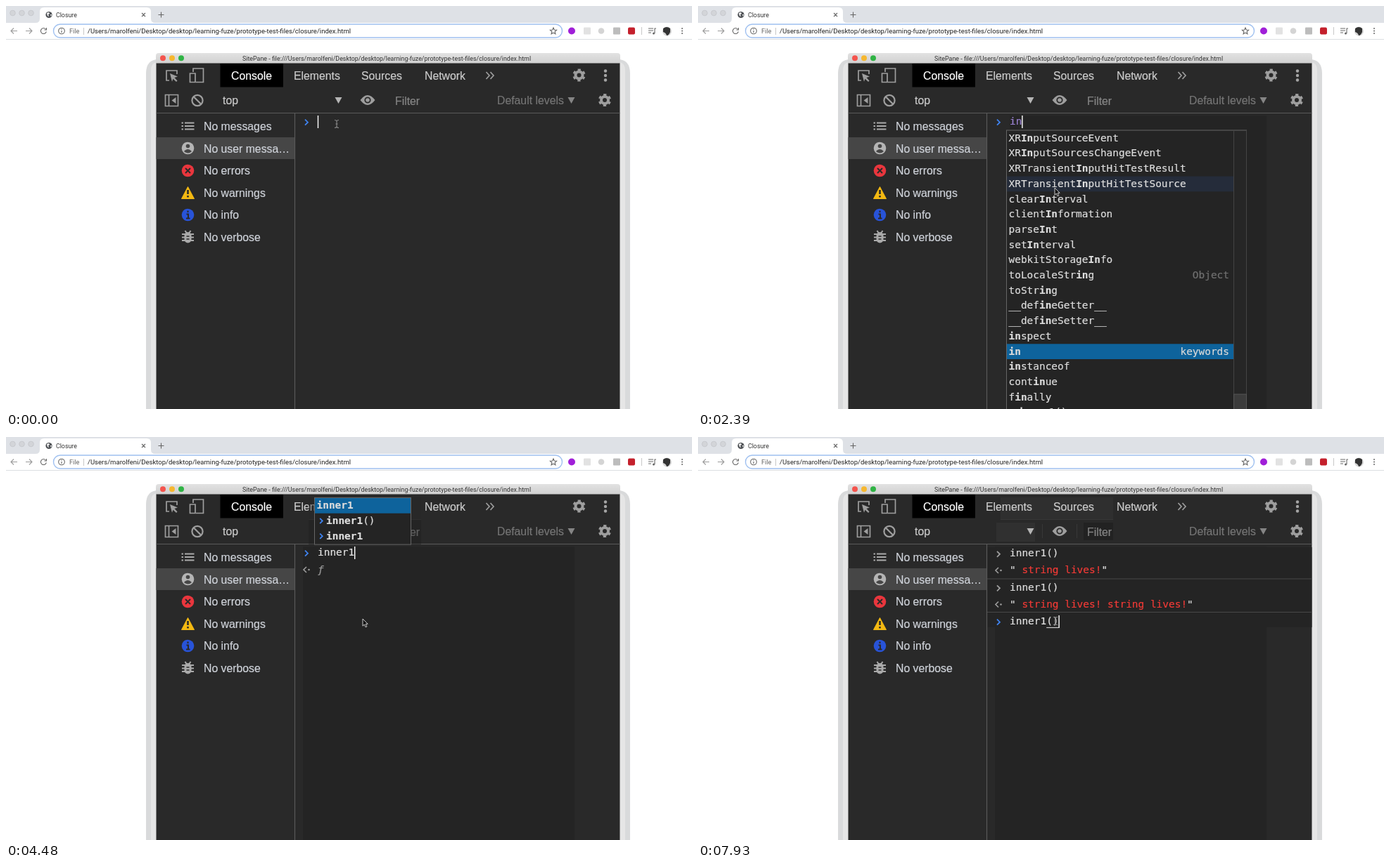
An HTML page that plays this animation: 975x574 px, repeating every 8 s.

```html
<!DOCTYPE html>
<html lang="en">
<head>
<meta charset="utf-8">
<title>Closure</title>
<style>
html, body { margin: 0; width: 100%; height: 100%; overflow: hidden; background: #fff; }
svg { display: block; width: 100%; height: 100%; }
text { white-space: pre; }
.ui { font: 9.53px Roboto, sans-serif; fill: #333; }
.tool { font: 15.8px "Liberation Sans", Arial, sans-serif; color: #ccc; }
.mono { font: 14.45px "DejaVu Sans Mono", monospace; }
.tool text, .mono text, .mono tspan { fill: currentColor; stroke: currentColor; stroke-width: .2px; }
.line { fill: none; stroke: #9e9e9e; stroke-width: 1.7; }
.thin { fill: none; stroke: #666; stroke-width: 1.1; }
</style>
</head>
<body>
<svg viewBox="0 0 975 574">
  <defs>
    <linearGradient id="bar" x2="0" y2="1"><stop stop-color="#e2e2e2"/><stop offset="1" stop-color="#d0d0d0"/></linearGradient>
    <g id="gear" fill="none" stroke="#9e9e9e">
      <circle r="5" stroke-width="4"/>
      <circle r="7.6" stroke-width="3" stroke-dasharray="4 3.959" stroke-dashoffset="2" transform="rotate(30)"/>
    </g>
  </defs>

  <!-- browser tab strip -->
  <path fill="#dee1e6" d="M0 0h975v24H0z"/>
  <path fill="#fff" d="M42 24q6 0 6-6V8q0-6 6-6h146q6 0 6 6v10q0 6 6 6zM0 24h975v24H0z"/>
  <g fill="#d3d5d9" stroke="#c3c5c9" stroke-width=".8"><circle cx="9.5" cy="10" r="3.8"/><circle cx="22.5" cy="10" r="3.8"/><circle cx="35.5" cy="10" r="3.8"/></g>
  <circle cx="61" cy="12.5" r="4.6" fill="#505357"/>
  <path d="M58 10l3-1 1 2-2 1 1 3-2-1zM63 12l2 0-1 3z" fill="#fff"/>
  <text class="ui" x="71" y="15.5" style="font-size:8.8px">Closure</text>
  <path class="thin" d="M193 10l5 5m0-5l-5 5M216.5 12.5h8m-4-4v8"/>

  <!-- address bar -->
  <path d="M0 47.5h975" stroke="#dcdee1"/>
  <rect x="67.5" y="26" width="723" height="19" rx="9.5" fill="#fff" stroke="#9fc0f0" stroke-width="1.4"/>
  <path class="thin" stroke-opacity=".65" d="M16 35.5H7m4-4l-4 4 4 4M28 35.5h9m-4-4l4 4-4 4"/>
  <path class="thin" d="M56.5 33a4 4 0 1 0 .8 3.5M57.5 31v3h-3"/>
  <circle class="thin" cx="79" cy="35.5" r="4.3"/><path class="thin" d="M79 35v3m0-5.5v1.3"/>
  <text class="ui" x="90" y="38.7" style="font-size:9.2px;fill:#666">File</text>
  <path d="M110.5 31v10M903.5 30v11" stroke="#c8c8c8"/>
  <text class="ui" x="116" y="38.7" style="fill:#222">/Users/marolfeni/Desktop/desktop/learning-fuze/prototype-test-files/closure/index.html</text>
  <path class="thin" d="M778 31l1.3 3 3.3.3-2.5 2.2.8 3.3-2.9-1.7-2.9 1.7.8-3.3-2.5-2.2 3.3-.3z"/>
  <circle cx="804" cy="35.5" r="5" fill="#a01fd8"/>
  <rect x="821" y="30.5" width="10" height="10" rx="1" fill="#e2e2e2"/>
  <circle cx="846" cy="35.5" r="4.3" fill="#d4d4d4"/>
  <rect x="863" y="30.5" width="10" height="10" rx="1" fill="#bcbcbc"/>
  <rect x="884" y="30.5" width="10" height="10" rx="2" fill="#c4202c"/>
  <path class="thin" d="M913 32h7m-7 3h7m-7 3h4m5 1v-7h2"/><circle cx="920.5" cy="39" r="1.5" fill="#666"/>
  <circle cx="939.5" cy="36" r="6.5" fill="#d5d5d5"/><path d="M934 32q5-4 10 0v5q-2 5-5 5-1-4-5-5z" fill="#333"/>
  <g fill="#666"><circle cx="961" cy="32" r="1"/><circle cx="961" cy="35.5" r="1"/><circle cx="961" cy="39" r="1"/></g>

  <!-- tool window -->
  <path fill="#d9dadb" d="M199 574V96q0-20 18-20h652q18 0 18 20v478z"/>
  <path fill="#e6e6e6" d="M206 574V92q0-12 10-12h654q10 0 10 12v482z"/>
  <path fill="url(#bar)" d="M213 82V71q0-4 4-4h652q4 0 4 4v11z"/>
  <circle cx="223" cy="74.3" r="4" fill="#f4544d"/><circle cx="236" cy="74.3" r="4" fill="#f6b72f"/><circle cx="249" cy="74.3" r="4" fill="#2fb344"/>
  <text class="ui" x="336" y="77.6" style="font-size:8.9px">SitePane - file:///Users/marolfeni/Desktop/desktop/learning-fuze/prototype-test-files/closure/index.html</text>
  <path fill="#292929" d="M213.5 81.5h659V574h-659z"/>
  <g id="back"></g>
  <path fill="#000" d="M304.5 82h89.500v33.500h-89.500z"/>
  <path d="M213.5 152.5h659M410.5 152v422" stroke="#5a5a5a" stroke-width="1.2"/>
  <path fill="#464646" d="M213.5 187h196.500v31H213.5z"/>

  <g class="tool">
    <text x="320" y="104.5" style="color:#fff">Console</text>
    <text x="409" y="104.5">Elements</text>
    <text x="505" y="104.5">Sources</text>
    <text x="595" y="104.5">Network</text>
    <text x="308" y="140">top</text>
    <text x="553" y="140.5" style="color:#858585">Filter</text>
    <text x="698" y="140" style="color:#757575">Default levels</text>
    <g id="side"></g>
  </g>

  <!-- toolbar icons -->
  <path class="line" d="M232 106h-4V92h15v5"/><path d="M233 96l11 4.500-4.500 1.500 4 4.500-1.500 1.500-4.500-4.300-1.500 4z" fill="#9e9e9e"/>
  <path class="line" d="M266 94v-5h14.500v19.500H270M261.5 96h7.500v12.500h-7.500z"/>
  <path class="line" d="M682.5 94l4.500 5-4.500 5m6-10l4.500 5-4.500 5"/>
  <use href="#gear" x="814.5" y="98.5"/><use href="#gear" x="851" y="134"/>
  <g fill="#a5a5a5"><circle cx="852" cy="92.5" r="2.2"/><circle cx="852" cy="99" r="2.2"/><circle cx="852" cy="105.5" r="2.2"/></g>
  <path class="line" d="M226.5 126.5h18v16h-18zM231.5 127v15"/><path d="M241.5 130v9l-6-4.500z" fill="#9e9e9e"/>
  <circle class="line" cx="272" cy="134.5" r="7.6" style="stroke-width:2.2"/><path class="line" d="M267 129.5l10 10" style="stroke-width:2.2"/>
  <path d="M467.5 130h10l-5 9z" fill="#b5b5b5"/><path d="M798.5 130h10l-5 9z" fill="#858585"/>
  <path d="M503.5 134q10.500-14 21 0-10.500 14-21 0z" fill="#9e9e9e"/><circle cx="514" cy="134" r="3.7" fill="#9e9e9e" stroke="#292929" stroke-width="1.8"/>

  <!-- sidebar icons -->
  <path d="M249.5 166.5h2.500m2 0h13.500m-18 4.500h2.500m2 0h13.500m-18 4.500h2.500m2 0h13.500" stroke="#aaa" stroke-width="2"/>
  <circle cx="258.5" cy="202.5" r="8.8" fill="#b5b5b5"/><circle cx="258.5" cy="199.5" r="2.8" fill="#464646"/><path d="M253 207q5.500-6 11 0-5.500 5-11 0z" fill="#464646"/>
  <circle cx="258.5" cy="234.5" r="8.8" fill="#e9363d"/><path d="M255 231l7 7m0-7l-7 7" stroke="#292929" stroke-width="2"/>
  <path d="M258.5 257.5l9 17h-18z" fill="#f4b912" stroke="#f4b912" stroke-linejoin="round"/><path d="M258.5 262v6m0 2v2.500" stroke="#292929" stroke-width="2.5"/>
  <circle cx="258.5" cy="297.5" r="8.8" fill="#2853d8"/><path d="M258.5 291.5v2.500m-2 2.500h2.500v6m-3 0h5.500" fill="none" stroke="#292929" stroke-width="2"/>
  <path d="M250 325h17m-17 4.500h17m-17 4.500h17m-12.500-14l2 3m6-3l-2 3" stroke="#aaa" stroke-width="2"/><rect x="253.5" y="322" width="10" height="15.5" rx="5" fill="#aaa"/><path d="M256.5 328h4m-4 4h4" stroke="#292929" stroke-width="1.7"/>

  <g id="live" class="mono"></g>
  <path id="arrow" d="M0 0v10.200l2.400-2.200 1.700 3.800 1.800-.8-1.700-3.700h3z" fill="#111" stroke="#ddd" stroke-width=".9"/>
  <path id="beam" d="M-3-5.500q2.500 0 3 1.500.5-1.500 3-1.500M0-4v8M-3 5.500q2.500 0 3-1.500.5 1.500 3 1.500M-1.500 0h3" fill="none" stroke="#8a8a8a" stroke-width="1.1"/>
</svg>
<script>
const $ = id => document.getElementById(id);
const CW = 8.7, ROW = 21.7, X = 443, LOOP = 8000;
const CALL = 'inner1()';

// time, typed text, caret column (-1 while blinked off)
const steps = [
  [0, '', 0], [300, '', -1], [750, '', 0], [1200, '', -1], [1800, '', 0],
  [2090, 'i', 1], [2240, 'i', 1], [2390, 'in', 2], [2540, 'inn', 3], [2680, 'inne', 4],
  [2830, 'inner', 5], [3280, 'inner', -1], [3880, 'inner', 5], [4330, 'inner', -1],
  [4480, 'inner1', 6], [4930, 'inner1', -1], [5080, CALL, 7], [5230, CALL, 7],
  [5380, CALL, 8], [5830, CALL, -1], [6280, CALL, 8], [6430, '', 0], [6880, '', -1],
  [7030, CALL, 8], [7480, '', 0], [7930, CALL, 8]
];
// pointer position every 150 ms
const path = [[470, 168], [490, 190], [540, 235], [580, 270], [598, 284], [590, 283],
  [560, 273], [534, 261], [520, 260], [511, 261], [507, 259]];
const longList = ('XRInputSourceEvent XRInputSourcesChangeEvent XRTransientInputHitTestResult ' +
  'XRTransientInputHitTestSource clearInterval clientInformation parseInt setInterval ' +
  'webkitStorageInfo toLocaleString toString __defineGetter__ __defineSetter__ inspect in ' +
  'instanceof continue finally >inner1()').split(' ');
const shortList = ['inner1', 'innerHeight', 'innerWidth', '>inner1()', '>inner1'];
const notes = new Map([['toLocaleString', ['Object', '#707070']], ['in', ['keywords', '#d8d8d8']]]);

const rect = (x, y, w, h, fill, more = '') =>
  `<rect x="${x}" y="${y}" width="${w}" height="${h}" fill="${fill}" ${more}/>`;
const text = (x, y, s, color = '#dcdcdc', more = '') =>
  `<text x="${x}" y="${y}" style="color:${color};${more}">${s}</text>`;
const stroke = (d, color, w = 1) => `<path d="${d}" fill="none" stroke="${color}" stroke-width="${w}"/>`;
const chevron = (x, y, color, s = 4) => stroke(`M${x - s / 2} ${y - s}l${s} ${s}-${s} ${s}`, color, 1.8);
const answer = y => stroke(`M427 ${y - 4}l-4 4 4 4`, '#9e9e9e', 1.6) + `<circle cx="430.5" cy="${y}" r="1.3" fill="#9e9e9e"/>`;

function popup(y, w, items, typed, picked, hover) {
  const scrolls = items.length > 9;
  let s = rect(438.5, y, w, items.length * ROW + 1.5, '#242424', 'stroke="#666"');
  items.forEach((item, i) => {
    const top = y + .5 + i * ROW, past = item[0] === '>', name = past ? item.slice(1) : item;
    if (i === picked || i === hover)
      s += rect(439, top, w - (scrolls ? 19 : 1), ROW, i === picked ? '#0e639c' : '#252c3a');
    if (past) s += chevron(448, top + 10.8, '#3f83f0', 3.6);
    s += text(past ? 455 : 441.5, top + 15.2,
      name.replace(new RegExp(typed, 'i'), '<tspan font-weight="bold">$&</tspan>'));
    if (notes.has(name)) {
      const [label, color] = notes.get(name);
      s += text(414 + w, top + 15.2, label, color, 'text-anchor:end');
    }
  });
  if (scrolls)
    s += rect(420.5 + w, y + .5, 18, 400, '#262626', 'stroke="#444"') +
      rect(420.5 + w, 553, 18, 40, '#3c3c3c', 'stroke="#555"');
  return s;
}

function results(n) {
  let s = '';
  for (let i = 0; i < n; i++) {
    const y = 166 + i * 48.5;
    s += chevron(427, y + .8, '#9e9e9e') + text(X, y + 4.2, CALL) + answer(y + 24) +
      text(X, y + 28, `"<tspan style="color:#f03a36">${' string lives!'.repeat(i + 1)}</tspan>"`) +
      stroke(`M411 ${202 + i * 47.5}h461.5`, '#484848');
  }
  return s;
}

function shades(t, rows) {
  let s = '';
  if (t >= 2680) s = rect(422, 156, 386, 418, '#242424');
  else if (t >= 2240) s = rect(443, 156, 365, 418, '#242424');
  else if (t >= 300) s = rect(443, 156, 163, 141, '#242424');
  if (rows) s += rect(411, 157, 461.5, rows === 1 ? 65 : 114, '#242424');
  if (t >= 4480) s += rect(430, 86, 160, 31, '#2f2f2f') + stroke('M430 117.5h160', '#383838');
  if (t >= 5080) s += rect(424, 122, 55, 27, '#303030') + rect(548, 122, 42, 25, '#222') +
    stroke('M489.5 124v20M538.5 124v20', '#383838');
  return s;
}

function draw([t, typed, caret]) {
  const rows = t >= 7480 ? 2 : t >= 6430 ? 1 : 0;
  const top = 156 + rows * 49, base = top + 13;
  let s = results(rows) + chevron(427, top + 9.7, '#3f83f0');
  s += text(X, base, typed, typed === 'in' ? '#9980d0' : '#e2e2e2');
  if (t >= 2540 && t < 4480) s += text(X + typed.length * CW, base, 'inner1'.slice(typed.length), '#777');
  if (t >= 2680 && t < 5230) s += answer(189) + text(X, 194, 'ƒ', '#999', 'font-style:italic');
  if (typed === CALL) s += stroke(`M${X + 6 * CW} ${top + 17.5}h${2 * CW}`, '#ccc', 1.2);
  if (caret >= 0) s += rect(X + caret * CW - .2, top, 1.4, 18, '#fff');
  if (t >= 2240 && t < 2540) s += popup(177, typed === 'i' ? 355 : 341, longList, typed, 14, 3);
  else if (t >= 2540 && t < 4480) s += popup(177, 149.5, shortList, typed, 0, 3);
  else if (t >= 4480 && t < 5080)
    s += rect(430, 86, 160, 68, '#1c1c1c', 'opacity=".35"') +
      popup(86.5, 137, ['inner1', '>inner1()', '>inner1'], typed, 0, -1);
  $('back').innerHTML = shades(t, rows);
  $('live').innerHTML = s;
}

$('side').innerHTML = ['messages', 'user messa…', 'errors', 'warnings', 'info', 'verbose']
  .map((s, i) => text(281, 177 + i * 31.55, 'No ' + s, '#cfd3da')).join('');

let shown;
function tick() {
  const t = performance.now() % LOOP;
  const step = steps.findLast(s => s[0] <= t);
  if (step !== shown) draw(shown = step);
  const [x, y] = path[Math.min(path.length - 1, Math.floor(t / 150))];
  const over = t < 150 || t >= 7480;
  $('arrow').setAttribute('transform', `translate(${x} ${y})`);
  $('beam').setAttribute('transform', t < 150 ? `translate(${x} ${y})` : 'translate(508 262)');
  $('arrow').style.display = over ? 'none' : '';
  $('beam').style.display = over ? '' : 'none';
  requestAnimationFrame(tick);
}
tick();
</script>
</body>
</html>
```
